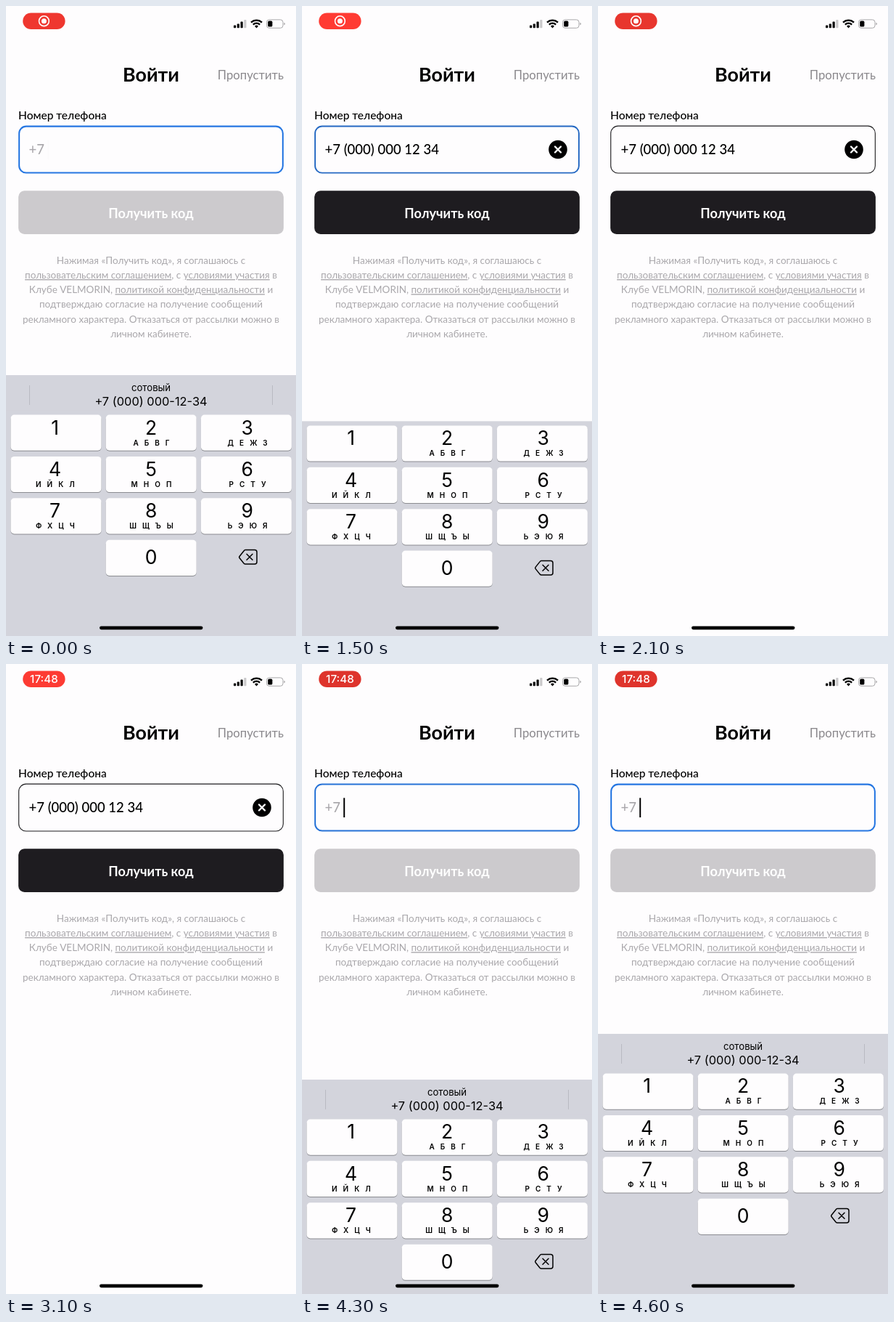
Animation of 400x867 px, one loop 4.7 s. Source, as an HTML page:

```html
<!DOCTYPE html>
<html lang="ru">
<head>
<meta charset="utf-8">
<title>Вход</title>
<style>
  html, body { margin: 0; width: 100%; height: 100%; overflow: hidden; background: #fefdfe; }
  svg { display: block; width: 400px; height: 867px; }
  text { font-family: Lato, "Open Sans", sans-serif; white-space: pre; }
  .ui { font-family: Inter, Roboto, sans-serif; }
  .mid { text-anchor: middle; }
  .legal { font-size: 13.5px; fill: #a9a7ab; }
  .link { text-decoration: underline; text-decoration-thickness: 1px; text-underline-offset: 3px; text-decoration-skip-ink: none; }
</style>
</head>
<body>
<svg viewBox="0 0 400 867">
  <rect width="400" height="867" fill="#fefdfe"/>

  <rect id="pill" x="23.2" y="9.4" width="58.4" height="22.6" rx="11.3"/>
  <g id="record">
    <circle cx="52.4" cy="20.7" r="6.9" fill="none" stroke="#fff" stroke-width="1.6"/>
    <circle cx="52.4" cy="20.7" r="3.5" fill="#fff"/>
  </g>
  <text id="clock" class="ui mid" x="52.4" y="26.1" font-size="15.2" font-weight="500" fill="#fff">17:48</text>

  <g id="bars"></g>
  <g fill="none" stroke="#000" stroke-width="2.3">
    <path d="M338 22.6a10.8 10.8 0 0 1 15 0"/>
    <path d="M340.8 25.6a6.8 6.8 0 0 1 9.4 0"/>
  </g>
  <path d="M345.5 30.4l-2.5-2.7a3.6 3.6 0 0 1 5 0z"/>
  <rect x="359.5" y="18.9" width="22.5" height="11.4" rx="3.4" fill="none" stroke="#a9a8aa"/>
  <rect x="361.2" y="20.6" width="6.2" height="8" rx="1.6"/>
  <path d="M383.4 22.7q1.6.7 1.6 1.9t-1.6 1.9z" fill="#a9a8aa"/>

  <text class="mid" x="200" y="104.3" font-size="26.8" font-weight="700">Войти</text>
  <text x="383" y="100.8" font-size="16.7" fill="#8b898d" text-anchor="end">Пропустить</text>
  <text x="17" y="155.8" font-size="15.5" font-weight="500">Номер телефона</text>

  <rect id="field" fill="none"/>
  <text id="value" x="31.5" y="204.3" font-size="18.5" font-weight="500"></text>
  <rect id="caret" x="57.2" y="184.3" width="2" height="26.8"/>
  <g id="clear">
    <circle cx="353" cy="197.5" r="12.8"/>
    <path d="M349 193.5l8 8m0-8l-8 8" stroke="#fff" stroke-width="2.4" stroke-linecap="round"/>
  </g>

  <rect id="button" x="17.1" y="254.2" width="365.8" height="59.7" rx="8.5"/>
  <text class="mid" x="200" y="291.8" font-size="18.1" font-weight="700" fill="#fff">Получить код</text>

  <g id="legal"></g>
  <g id="keyboard"></g>
  <rect x="129" y="853.4" width="142.5" height="4.8" rx="2.4"/>
</svg>
<script>
const LOOP = 4700;
const FILL = 1480;    // suggestion tapped
const CLOCK = 2450;   // pill switches to the time
const CLEAR = 3450;   // clear button tapped
const FOCUS = 4110;   // field tapped again
const KEYBOARD_TOP = 508, KEYBOARD_HEIGHT = 360, BAR_HEIGHT = 48.5;
const BLACK = [30, 29, 32], BLUE = [38, 119, 226];
const RED_DIM = [220, 51, 43], RED = [255, 59, 51];

const $ = id => document.getElementById(id);
const clamp = x => Math.max(0, Math.min(1, x));
const mix = (a, b, k) => `rgb(${a.map((v, i) => Math.round(v + (b[i] - v) * k))})`;
const show = (id, on) => $(id).setAttribute('opacity', Number(on));
const set = (id, attrs) => {
  for (const name in attrs) $(id).setAttribute(name, attrs[name]);
};

function buildBars() {
  $('bars').innerHTML = [3.8, 5.8, 8.6, 11.2].map((h, i) =>
    `<rect x="${314 + i * 4.75}" y="${30.2 - h}" width="3.2" height="${h}" rx=".8"
      fill="${i < 3 ? '#000' : '#c9c8ca'}"/>`).join('');
}

function buildLegal() {
  const link = s => `<tspan class="link">${s}</tspan>`;
  const lines = [
    'Нажимая «Получить код», я соглашаюсь с',
    `${link('пользовательским соглашением')}, с ${link('условиями участия')} в`,
    `Клубе VELMORIN, ${link('политикой конфиденциальности')} и`,
    'подтверждаю согласие на получение сообщений',
    'рекламного характера. Отказаться от рассылки можно в',
    'личном кабинете.'
  ];
  $('legal').innerHTML = lines.map((s, i) =>
    `<text class="legal mid" x="200" y="${354.8 + i * 20.2}">${s}</text>`).join('');
}

function buildKeyboard() {
  const letters = ['', 'АБВГ', 'ДЕЖЗ', 'ИЙКЛ', 'МНОП', 'РСТУ', 'ФХЦЧ', 'ШЩЪЫ', 'ЬЭЮЯ'];
  const key = (digit, caption, col, row) => {
    const x = 6.5 + col * 131.2, y = 54.5 + row * 57.4, cx = 67.6 + col * 132.6;
    const face = (dy, fill) =>
      `<rect x="${x}" y="${y + dy}" width="125" height="49.2" rx="5" fill="${fill}"/>`;
    return face(1, '#8b8c91') + face(0, '#fefdfe') +
      `<text class="ui mid" x="${cx}" y="${y + (digit ? 27 : 33.6)}" font-size="26.5">${digit}</text>
       <text class="ui mid" x="${cx + 4.3}" y="${y + 42}" font-size="10" font-weight="600"
         letter-spacing="8">${caption}</text>`;
  };
  $('keyboard').innerHTML = `
    <g id="suggestion">
      <rect width="400" height="${BAR_HEIGHT + 1}" fill="#d3d4dc"/>
      <path d="M32.5 14v27M367.5 14v27" stroke="#b9bac2"/>
      <text class="ui mid" x="200" y="22.3" font-size="13.2">сотовый</text>
      <text class="ui mid" x="200" y="41.8" font-size="16.4">+7 (000) 000-12-34</text>
    </g>
    <rect y="${BAR_HEIGHT}" width="400" height="${KEYBOARD_HEIGHT - BAR_HEIGHT}" fill="#d3d4dc"/>
    ${letters.map((s, i) => key(i + 1, s, i % 3, Math.floor(i / 3))).join('')}
    ${key(0, '', 1, 3)}
    <g fill="none" stroke="#000" stroke-width="1.5" stroke-linecap="round" stroke-linejoin="round">
      <path d="M330 240.5h13q3 0 3 3v13.500q0 3-3 3h-13q-1 0-2-1l-6-7.500q-.6-1 0-2l6-7.500q1-1.500 2-1.500z"/>
      <path d="M332 246.300l8 8m0-8l-8 8"/>
    </g>`;
}

// Critically damped spring, from 0 towards 1
function spring(ms) {
  const x = Math.max(0, ms) * 0.0165;
  return 1 - (1 + x) * Math.exp(-x);
}

// The keyboard leaves without its suggestion bar and returns with it
function keyboardShift(t) {
  return t < FOCUS
    ? spring(t - FILL) * (KEYBOARD_HEIGHT - BAR_HEIGHT)
    : (1 - spring(t - FOCUS)) * KEYBOARD_HEIGHT;
}

function caretOpacity(t) {
  if (t >= FOCUS) return 1;
  if (t >= FILL) return 0;
  const p = t % 1000;
  return p < 600 ? clamp(p / 120) : clamp((750 - p) / 150);
}

function draw(t) {
  const focused = t < FILL || t >= FOCUS;
  const filled = t >= FILL && t < CLEAR;

  const pulse = 0.5 - 0.5 * Math.cos((t - 4450) / 2000 * Math.PI * 2);
  set('pill', { fill: mix(RED_DIM, RED, clamp(pulse * 1.3)) });
  show('record', t < CLOCK);
  show('clock', t >= CLOCK);

  const fade = start => 1 - (1 - clamp((t - start) / 250)) ** 2;
  const blue = 1 - fade(FILL) + fade(FOCUS);
  const w = 1.1 + 0.95 * blue;
  set('field', {
    x: 17.1 + w / 2, y: 164.6 + w / 2, width: 365.8 - w, height: 66 - w, rx: 10.6 - w / 2,
    stroke: mix(BLACK, BLUE, blue), 'stroke-width': w
  });

  $('value').textContent = filled ? '+7 (000) 000 12 34' : '+7';
  set('value', { fill: focused ? '#a9a7ab' : '#000' });
  show('clear', filled);
  set('caret', { opacity: caretOpacity(t) });
  set('button', { fill: filled ? '#1e1c20' : '#cccacd' });

  show('suggestion', focused);
  set('keyboard', { transform: `translate(0 ${KEYBOARD_TOP + keyboardShift(t)})` });
}

buildBars();
buildLegal();
buildKeyboard();

const start = performance.now();
function tick() {
  draw((performance.now() - start) % LOOP);
  requestAnimationFrame(tick);
}
tick();
</script>
</body>
</html>
```
